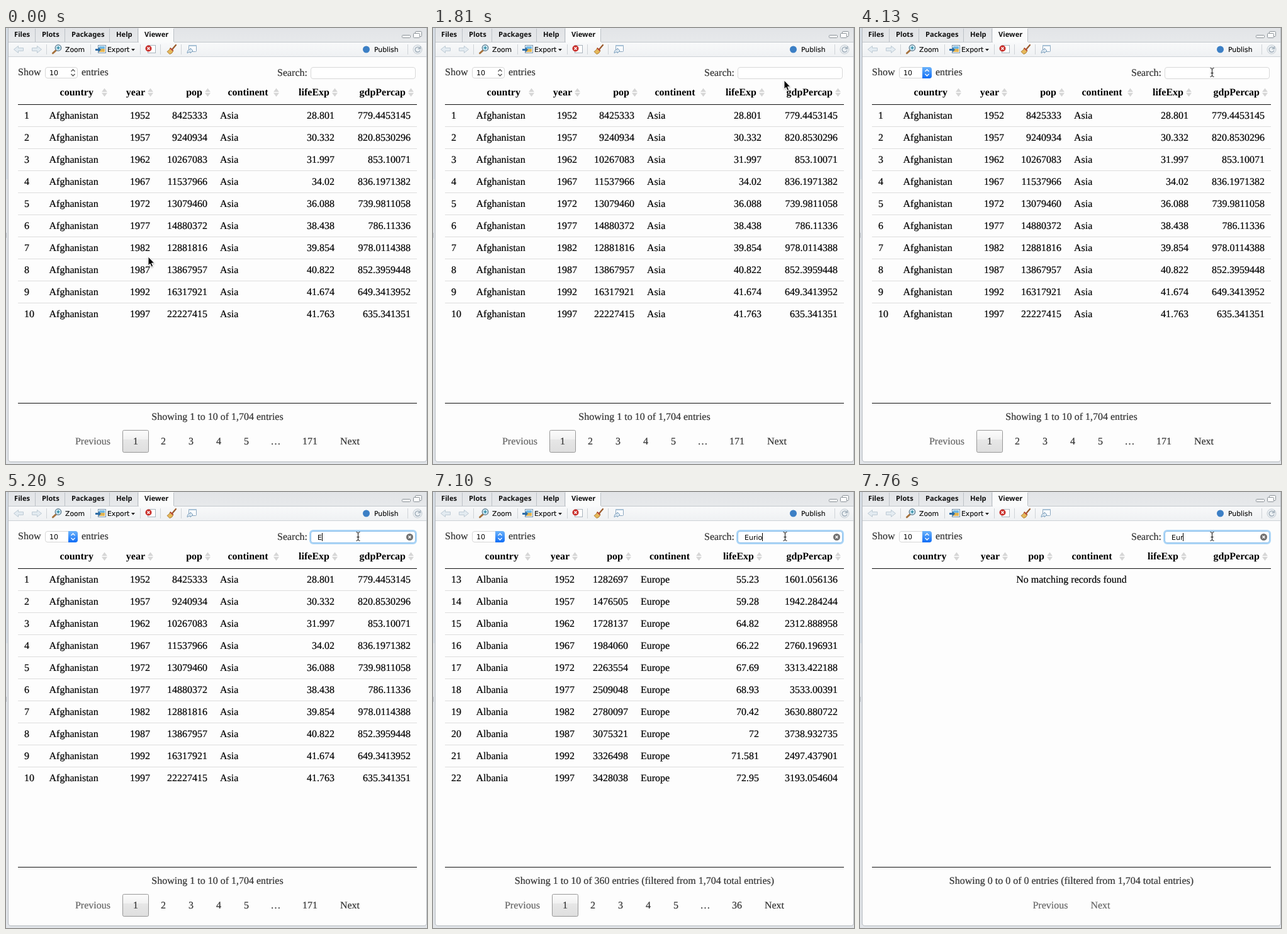
An HTML page for the animation above (8000 ms loop, 669 px wide and 692 px high).

```html
<!DOCTYPE html>
<html lang="en">
<head>
<meta charset="utf-8">
<title>Data viewer</title>
<style>
  html, body { margin: 0; width: 100%; height: 100%; overflow: hidden; background: #e1e4e8; }
  svg { display: block; width: 669px; height: 692px; }
  text {
    font: 16px "Liberation Serif", serif; color: #000; fill: currentColor;
    stroke: currentColor; stroke-width: .2px; text-rendering: geometricPrecision;
  }
  .label { color: #333; }
  .off { color: #666; }
  .head { font-weight: bold; stroke: none; }
  .tab { font: bold 11.2px "Noto Sans", sans-serif; color: #111; stroke: none; }
  .tool { font: 10.8px "DejaVu Sans", sans-serif; color: #111; }
  .field { font: 11px "DejaVu Sans", sans-serif; stroke: none; }
  .end { text-anchor: end; }
  .mid { text-anchor: middle; }
</style>
</head>
<body>
<svg viewBox="0 0 669 692" xmlns="http://www.w3.org/2000/svg">
  <defs>
    <linearGradient id="tabs" x2="0" y2="1"><stop stop-color="#e2e4e7"/><stop offset="1" stop-color="#e7e9eb"/></linearGradient>
    <linearGradient id="bar" x2="0" y2="1"><stop stop-color="#f8f9fa"/><stop offset="1" stop-color="#eff1f3"/></linearGradient>
    <linearGradient id="page" x2="0" y2="1">
      <stop stop-color="#fcfcfc"/><stop offset=".42" stop-color="#f1f1f1"/>
      <stop offset=".42" stop-color="#e7e7e7"/><stop offset="1" stop-color="#dedede"/>
    </linearGradient>
    <linearGradient id="blue" x2="0" y2="1"><stop stop-color="#6cb3fa"/><stop offset="1" stop-color="#0f6df6"/></linearGradient>
    <filter id="soft" x="-50%" y="-50%" width="200%" height="200%"><feDropShadow dx="0" dy="1" stdDeviation="1" flood-opacity=".35"/></filter>
  </defs>
  <g id="frame"></g>
  <g id="controls"></g>
  <g id="table"></g>
  <g id="pager"></g>
  <g id="arrow" filter="url(#soft)"><path d="M0 0V14L3 11.2L5.3 16.2L7.7 15.2L5.5 10.2H9.8Z" fill="#000" stroke="#fff"/></g>
  <path id="beam" d="M556.5 63.5q3 0 3 2.5v9q0 2.5-3 2.5M562.5 63.5q-3 0-3 2.5v9q0 2.5 3 2.5M557.5 71.5h4" fill="none" stroke="#111"/>
</svg>
<script>
const LOOP = 8000, CENTER = 336;
const SERIF = '16px "Liberation Serif"', FIELD = '11px "DejaVu Sans"', TAB = 'bold 11.2px "Noto Sans"';
const el = id => document.getElementById(id);
const text = (x, y, s, cls = "") => `<text x="${x}" y="${y}" class="${cls}">${s}</text>`;
const rect = (x, y, w, h, fill, more = "") => `<rect x="${x}" y="${y}" width="${w}" height="${h}" fill="${fill}" ${more}/>`;
const path = (d, fill, stroke = "none", more = "") => `<path d="${d}" fill="${fill}" stroke="${stroke}" ${more}/>`;
const circle = (x, y, r, fill, more = "") => `<circle cx="${x}" cy="${y}" r="${r}" fill="${fill}" ${more}/>`;

const pen = document.createElement("canvas").getContext("2d");
function widthOf(s, font) {
  pen.font = font;
  return pen.measureText(s).width;
}

// Pointer moves; bend gives each axis its own acceleration
const home = { x: 226, y: 363 };
const moves = [
  { from: 540, to: 1270, x: 496, y: 212, bend: [1.5, 3.2] },
  { from: 1360, to: 1810, x: 558, y: 83, bend: [1, 1] },
  { from: 1990, to: 2160, x: 568, y: 81, bend: [1, 1] },
  { from: 2790, to: 3140, x: 559, y: 70, bend: [1, 1] }
];
const ACTIVE = 3590, BEAM = 4130, FOCUS = 4210, BLINK = 4660;
const typing = [[0, ""], [5200, "E"], [5730, "Eu"], [6210, "Eur"], [6830, "Euri"], [7100, "Eurio"], [7550, "Euri"], [7760, "Eur"]];
const tableSteps = [[0, "all"], [5280, "europe"], [7370, "none"]];
const TOTAL = 1704;
const matchSteps = [[0, TOTAL], [5280, 1116], [6290, 360], [7370, 0]];

const headings = ["country", "year", "pop", "continent", "lifeExp", "gdpPercap"];
// edges: right edge of each column; rows: pop, lifeExp, gdpPercap
const tables = {
  all: {
    edges: [156, 229, 320, 429, 522, 643], first: 1, country: "Afghanistan", continent: "Asia",
    rows: `8425333 28.801 779.4453145
      9240934 30.332 820.8530296
      10267083 31.997 853.10071
      11537966 34.02 836.1971382
      13079460 36.088 739.9811058
      14880372 38.438 786.11336
      12881816 39.854 978.0114388
      13867957 40.822 852.3959448
      16317921 41.674 649.3413952
      22227415 41.763 635.341351`
  },
  europe: {
    edges: [150, 225, 310, 422, 518, 643], first: 13, country: "Albania", continent: "Europe",
    rows: `1282697 55.23 1601.056136
      1476505 59.28 1942.284244
      1728137 64.82 2312.888958
      1984060 66.22 2760.196931
      2263554 67.69 3313.422188
      2509048 68.93 3533.00391
      2780097 70.42 3630.880722
      3075321 72 3738.932735
      3326498 71.581 2497.437901
      3428038 72.95 3193.054604`
  },
  none: { edges: [153, 230, 301, 416, 514, 643] }
};

function drawTabs() {
  let x = 13, s = "";
  for (const name of ["Files", "Plots", "Packages", "Help", "Viewer"]) {
    const w = Math.round(widthOf(name, TAB));
    if (name === "Viewer") s += rect(x - 9, 0, w + 18, 23, "#fafbfb");
    s += text(x, 14, name, "tab") + rect(x + w + 8, 1, 1, 21, "#bcc1c6");
    x += w + 19;
  }
  return s;
}

function drawFrame() {
  const navArrow = (x, dir) => path(`M${x} 34l${7 * dir}-5.5v3.2h${8 * dir}v4.6h${-8 * dir}v3.2Z`, "#e3ebf1", "#bdcad4");
  const pane = (x, y, w, h) => rect(x, y, w, h, "#fff", 'stroke="#8a9197" rx="1"');
  let s = rect(0, 0, 669, 692, "#e1e4e8") + rect(0, 0, 3, 240, "#d6dde5") + rect(0, 325, 1, 8, "#b5bac1");
  s += path("M3.5 -2V684q0 4.5 4.5 4.5H664q4.5 0 4.5-4.5V-2Z", "#fdfdfd", "#b4b9be");
  s += rect(4, 0, 664, 22, "url(#tabs)") + rect(4, 22, 664, 1, "#c3c8cd") + rect(4, 23, 664, 22, "url(#bar)") + rect(4, 45, 664, 1, "#cdd2d6");
  s += drawTabs() + pane(629.5, 11.5, 13, 4) + pane(650.5, 5.5, 10, 8) + pane(647.5, 8.5, 10, 7);

  s += navArrow(12.5, 1) + navArrow(56.5, -1);
  s += [64, 134, 213, 245, 278, 638].map(x => rect(x, 26, 1, 16, "#cfd3d7")).join("");

  // Zoom
  s += path("M80 35l-5.5 5", "none", "#a5713c", 'stroke-width="3" stroke-linecap="round"');
  s += circle(83, 31.5, 4.7, "#d5edf8", 'stroke="#6b8799" stroke-width="1.5"') + path("M80.5 31.5h5M83 29v5", "none", "#2f8ba4", 'stroke-width="1.5"');
  s += text(94, 38, "Zoom", "tool");

  // Export
  s += rect(146.5, 27.5, 12, 12, "#fff", 'stroke="#7794ad"') + rect(148, 29, 9, 4, "#74b9e5") + rect(148, 33, 9, 5, "#e4b451");
  s += path("M142 33h5v-2.5l4 4-4 4v-2.5h-5Z", "#2d6da7");
  s += text(161, 38, "Export", "tool") + path("M199 33h6l-3 3.5Z", "#222");

  // Remove, clear, open in window
  s += rect(225.5, 27.5, 12, 12, "#fff", 'stroke="#a9b4bd"') + circle(226.5, 32.5, 5, "#c9302c");
  s += path("M224.5 30.5l4 4m0-4l-4 4", "none", "#fff", 'stroke-width="1.5"');
  s += path("M270 27l-6 7", "none", "#9a5a2c", 'stroke-width="2.2" stroke-linecap="round"');
  s += path("M261 31.5l5 4.5q-2 5-6 5.5l-4-4q4-2 5-6Z", "#e6b95c", "#ad7e32") + path("M261 32l4.5 4", "none", "#b8443a", 'stroke-width="2"');
  s += rect(290.5, 27.5, 12, 10, "#f9fbfd", 'stroke="#8da9c0" rx="1"') + rect(290, 27, 13, 2, "#a7c1d6");
  s += path("M288 40q0-6 5-6v-2l4 4-4 4v-2q-3 0-5 2Z", "#dce8f1", "#7c9fbd");

  // Publish, refresh
  s += circle(572.5, 34, 5.5, "#3c7fc5") + text(585, 38, "Publish", "tool");
  s += circle(654, 34, 7, "#eef2f5", 'stroke="#c3cbd2"') + path("M657.5 32a4 4 0 1 0 .5 3.5M658.5 29v4h-4", "none", "#a5b2bd", 'stroke-width="1.6"');
  return s;
}

function drawControls({ active, focus, query, caret }) {
  let s = text(19, 75, "Show", "label") + text(120, 75, "entries", "label") + text(431, 76, "Search:", "label");
  s += rect(62.5, 62.5, 51, 17, "#fff", 'stroke="#d6d6d6" rx="3.5"') + text(69, 75, "10", "field");
  if (active) s += path("M99 62h11q4 0 4 4v10q0 4-4 4h-11Z", "url(#blue)");
  s += path("M103.5 69l3-3 3 3M103.5 73l3 3 3-3", "none", active ? "#fff" : "#555", 'stroke-width="1.4"');
  if (focus) s += rect(483.5, 61.5, 168, 20, "none", 'stroke="#add6f7" stroke-width="3" rx="4.5"');
  s += rect(484.5, 62.5, 166, 18, "#fff", `stroke="${focus ? "#8cc0ec" : "#d8d8d8"}" rx="3.5"`);
  s += text(495, 75.5, query, "field");
  if (query) s += circle(641.5, 71.5, 5.5, "#707070") + path("M639.5 69.5l4 4m0-4l-4 4", "none", "#fff", 'stroke-width="1.4"');
  if (caret) s += rect(495 + Math.round(widthOf(query, FIELD)), 65, 1, 13, "#000");
  return s;
}

function drawTable(name) {
  const { edges, rows, first, country, continent } = tables[name];
  const lefts = { 0: 68.5, 3: edges[2] + 20 };
  let s = rect(19, 121, 634, 1, "#111") + rect(19, 595, 634, 1, "#111");
  headings.forEach((heading, i) => {
    const x = edges[i] + .5;
    s += i in lefts ? text((lefts[i] + edges[i]) / 2, 107, heading, "head mid") : text(edges[i] - 8, 107, heading, "head end");
    s += path(`M${x} 95.5l4.5 6h-9ZM${x} 109l4.5-6h-9Z`, "#d6d6d6");
  });
  if (!rows) return s + text(CENTER, 144, "No matching records found", "mid");
  rows.split("\n").forEach((row, i) => {
    const [pop, life, gdp] = row.trim().split(" ");
    const y = 144 + 35 * i;
    s += text(29, y, first + i);
    [country, 1952 + 5 * i, pop, continent, life, gdp].forEach((cell, k) => {
      s += k in lefts ? text(lefts[k], y, cell) : text(edges[k], y, cell, "end");
    });
    if (i) s += rect(19, y - 23, 634, 1, "#ddd");
  });
  return s;
}

function drawPager(matches) {
  const count = n => n.toLocaleString("en-US");
  const filtered = matches < TOTAL ? ` (filtered from ${count(TOTAL)} total entries)` : "";
  let s = text(CENTER, 622, `Showing ${matches && 1} to ${matches && 10} of ${count(matches)} entries${filtered}`, "label mid");

  const pages = matches ? [1, 2, 3, 4, 5, "…", Math.ceil(matches / 10)] : [];
  const items = ["Previous", ...pages, "Next"].map(label => ({ label, w: widthOf(label, SERIF) }));
  const gap = i => items[i].label === "…" || items[i + 1]?.label === "…" ? 34.5 : 36;
  let x = CENTER - items.reduce((sum, { w }, i) => sum + w + (i < items.length - 1 ? gap(i) : 0), 0) / 2;
  items.forEach(({ label, w }, i) => {
    if (label === 1) s += rect(Math.round(x - 17) + .5, 638.5, 41, 35, "url(#page)", 'stroke="#979797" rx="2"');
    s += text(x, 661, label, i && matches ? "label" : "off");
    x += w + gap(i);
  });
  return s;
}

function pointer(t) {
  let { x, y } = home;
  for (const m of moves) {
    if (t < m.from) break;
    const steps = Math.round((m.to - m.from) / 90) + 1;
    const step = Math.floor((t - m.from) / (m.to - m.from) * (steps - 1)) + 1;
    const u = Math.min(1, step / steps);
    x += (m.x - x) * u ** m.bend[0];
    y += (m.y - y) * u ** m.bend[1];
  }
  return [x, y];
}

const at = (steps, t) => steps.findLast(([time]) => time <= t)[1];
const shown = {};
function refresh(id, value, draw) {
  const key = JSON.stringify(value);
  if (shown[id] === key) return;
  shown[id] = key;
  el(id).innerHTML = draw(value);
}

function render(t) {
  const query = at(typing, t);
  el("arrow").setAttribute("transform", `translate(${pointer(t).map(Math.round)})`);
  el("arrow").style.display = t < BEAM ? "" : "none";
  el("beam").style.display = t < BEAM ? "none" : "";
  refresh("controls", { active: t >= ACTIVE, focus: t >= FOCUS, query, caret: t >= FOCUS && (t < BLINK || query !== "") }, drawControls);
  refresh("table", at(tableSteps, t), drawTable);
  refresh("pager", at(matchSteps, t), drawPager);
}

el("frame").innerHTML = drawFrame();
const start = performance.now();
function tick() {
  render((performance.now() - start) % LOOP);
  requestAnimationFrame(tick);
}
tick();
</script>
</body>
</html>
```
